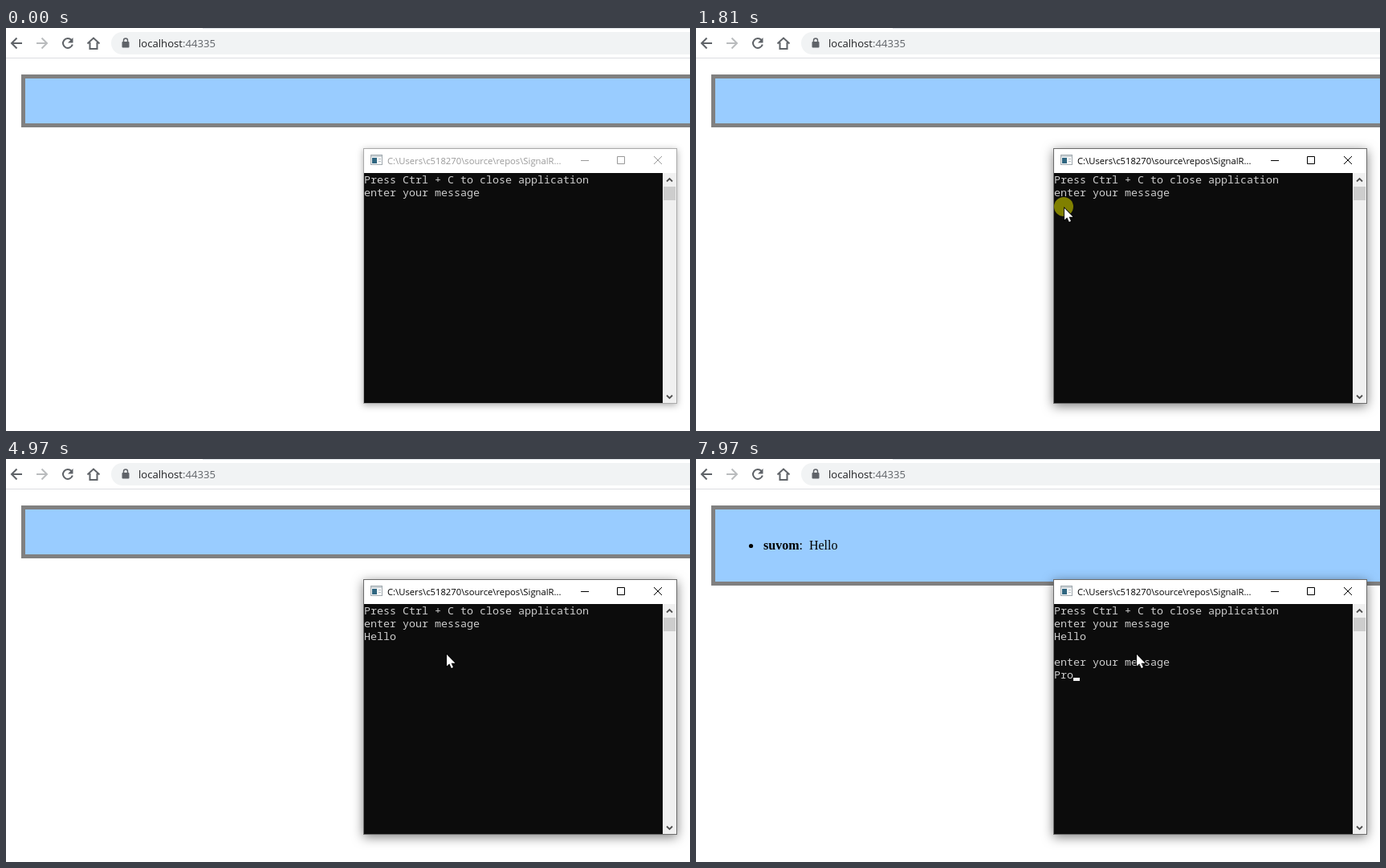
An HTML page for the animation above (8 s loop, 852 by 503 pixels).

```html
<!DOCTYPE html>
<html lang="en">
<head>
<meta charset="utf-8">
<title>Console message to browser</title>
<style>
  html, body { margin: 0; width: 100%; height: 100%; overflow: hidden; background: #fff; }
  svg { display: block; }
  text { white-space: pre; }
  .ui { font-family: "Open Sans", sans-serif; }
  .page { font: 16px "Liberation Serif", serif; }
  .console { font: 13.333px "Noto Sans Mono", monospace; fill: #ccc; }
  .icon { fill: none; stroke: #5f6368; stroke-width: 2; }
  #window { --ink: #999; --edge: #aaa; --shadow: drop-shadow(0 2px 4px rgba(0, 0, 0, .32)); }
  #window.active { --ink: #000; --edge: #6b6b6b; --shadow: drop-shadow(0 3px 7px rgba(0, 0, 0, .5)); }
  #frame { fill: #fff; stroke: var(--edge); filter: var(--shadow); }
  #title { fill: var(--ink); font-size: 11.25px; }
  #buttons { fill: none; stroke: var(--ink); }
</style>
</head>
<body>
<svg width="852" height="503" viewBox="0 0 852 503">
  <!-- browser toolbar -->
  <path d="M245 .5H852" stroke="#dee1e6"/>
  <path d="M0 37.5H852" stroke="#dcdee1"/>
  <rect x="131" y="5" width="760" height="28" rx="14" fill="#f1f3f4"/>
  <g class="icon">
    <path d="M20 19H7.5M13.5 12.5L7 19l6.5 6.5"/>
    <path d="M38 19H50.500M44.500 12.500L51 19l-6.500 6.500" stroke="#babcbe"/>
    <path d="M81.500 15A6 6 0 1 0 82.800 20.500"/>
    <path d="M83.500 12v6.500H77z" fill="#5f6368" stroke="none"/>
    <path d="M101.500 19.500L109 12.500l7.500 7M104.500 18v8h9v-8"/>
    <path d="M146.500 17.500v-2a2.500 2.500 0 0 1 5 0v2" stroke-width="1.500"/>
    <rect x="144.500" y="17" width="9" height="7.500" rx="1" fill="#5f6368" stroke="none"/>
  </g>
  <text class="ui" x="165" y="24" font-size="13.130" fill="#202124">localhost<tspan fill="#5f6368">:44335</tspan></text>

  <!-- web page -->
  <rect id="panel" x="21.5" y="60.5" width="900" height="61" fill="#9cf" stroke="gray" stroke-width="5"/>
  <g id="received">
    <circle cx="68.500" cy="108.500" r="2.600"/>
    <text class="page" x="84" y="113"><tspan font-weight="bold">suvom</tspan>:&nbsp; Hello</text>
  </g>

  <!-- console window -->
  <g id="window">
    <rect id="frame" x="445.5" y="150.5" width="390" height="318"/>
    <rect x="454.5" y="158.5" width="14" height="12" fill="#f4f6f7" stroke="#a3abb0"/>
    <path d="M455 160H468" stroke="#c9d0d4" stroke-width="2"/>
    <rect x="456" y="162" width="6" height="7" fill="#2f6680"/>
    <path d="M464 163.500h3M464 166.500h3" stroke="#b5bdc2"/>
    <text class="ui" id="title" x="475" y="170">C:\Users\c518270\source\repos\SignalR...</text>
    <path id="buttons" d="M716 165.500h10M761.500 160.500h9v9h-9zM807 160l10 10M817 160l-10 10"/>
    <rect x="446" y="181" width="372" height="287" fill="#0c0c0c"/>
    <rect x="818" y="181" width="17" height="287" fill="#f0f0f0"/>
    <rect x="819" y="198" width="15" height="17" fill="#cdcdcd"/>
    <path d="M823 191.500l3.500-3.500 3.500 3.500M823 458.500l3.500 3.500 3.500-3.500" fill="none" stroke="#505050" stroke-width="1.800"/>
    <text class="console" id="output"></text>
    <rect id="caret" width="8" height="4" fill="#f2f2f2"/>
  </g>

  <circle id="click" cx="458" cy="223" r="12" fill="#808000"/>
  <path id="mouse" d="M0 0V14.500L3.300 11.500 5.800 17 8 16 5.600 10.800H10.500Z" fill="#fff" stroke="#000" paint-order="stroke" stroke-width="1.600"/>
</svg>
<script>
const LOOP = 8000, TICK = 66;
const GREETING = 'Press Ctrl + C to close application\nenter your message\n';
const TYPED = [
  [3770, 'H'], [4040, 'e'], [4240, 'l'], [4380, 'l'], [4570, 'o'], [6160, '\n'],
  [6230, '\nenter your message\n'], [7440, 'P'], [7770, 'r'], [7970, 'o']
];
const CARET_TOGGLES = [2340, 2870, 3420, 3970, 4040, 4480, 4570, 4970, 5500, 6060, 6160, 7110, 7440, 7640, 7770];
// start time, ticks, dx, dy, easing power for x and y
const MOVES = [
  [130, 12, -288, -225, 1.3, 2],
  [924, 9, -31, -7, 1.6, 1.6],
  [1874, 4, 90, 19, 1.4, 1.4]
];

const $ = id => document.getElementById(id);
const show = (id, on) => $(id).setAttribute('visibility', on ? 'visible' : 'hidden');
const easeOut = (p, power) => 1 - (1 - p) ** power;

function mousePosition(t) {
  let x = 778, y = 457;
  for (const [start, ticks, dx, dy, px, py] of MOVES) {
    const p = Math.min(1, Math.max(0, Math.floor((t - start) / TICK) / ticks));
    x += dx * easeOut(p, px);
    y += dy * easeOut(p, py);
  }
  return [Math.round(x), Math.round(y)];
}

function drawConsole(t) {
  const typed = TYPED.filter(([at]) => at <= t).map(([, s]) => s).join('');
  const lines = (GREETING + typed).split('\n');
  $('output').innerHTML = lines.map((s, i) => `<tspan x="446" y="${194 + 16 * i}">${s}</tspan>`).join('');
  $('caret').setAttribute('x', 446 + 8 * lines.at(-1).length);
  $('caret').setAttribute('y', 177 + 16 * lines.length);
  show('caret', CARET_TOGGLES.filter(at => at <= t).length % 2);
}

function draw() {
  const t = performance.now() % LOOP;
  const received = t >= 6160;
  drawConsole(t);
  $('window').classList.toggle('active', t >= 1810);
  $('panel').setAttribute('height', received ? 95 : 61);
  show('received', received);
  show('click', t >= 1810 && t < 1940);
  show('mouse', t >= 130);
  $('mouse').setAttribute('transform', `translate(${mousePosition(t)})`);
  requestAnimationFrame(draw);
}
draw();
</script>
</body>
</html>
```
